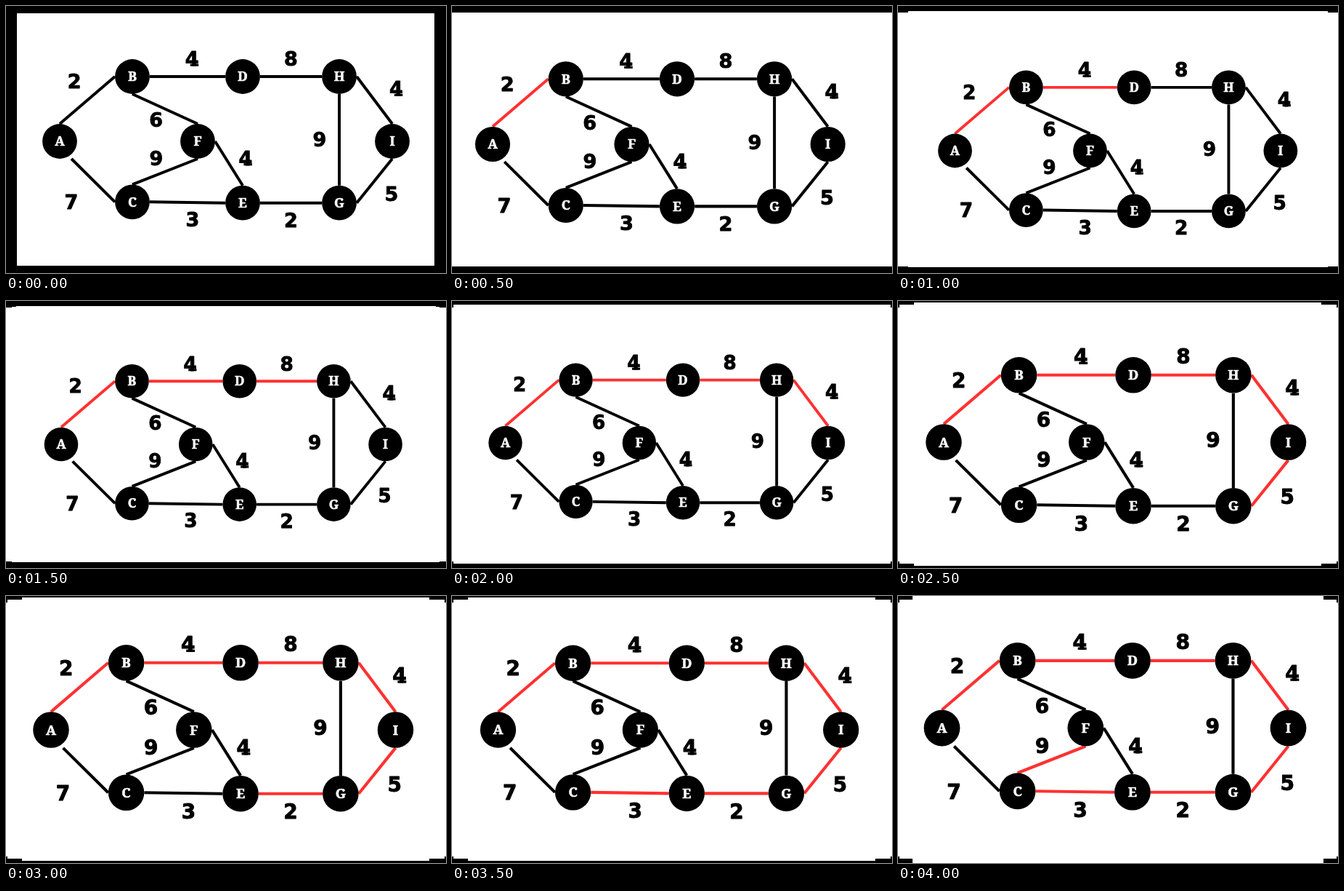
These frames come from a looping animation (606 px wide and 367 px high, 4.5 s). An HTML page with a canvas:

```html
<!DOCTYPE html>
<html lang="en">
<head>
<meta charset="utf-8">
<title>Depth-first search on a weighted graph</title>
<style>
  html, body { margin: 0; width: 100%; height: 100%; overflow: hidden; background: #000; }
  canvas { display: block; width: 606px; height: 367px; }
</style>
</head>
<body>
<canvas id="stage" width="606" height="367"></canvas>
<script>
const W = 606, H = 367, STEP = 500, R = 23.9;
const BLACK = '#000', WHITE = '#fff', RED = '#ff3131';
const ctx = document.getElementById('stage').getContext('2d');

// Node positions on three rows, relative to A.
const TOP = -89, BOTTOM = 84.7;
const nodes = {
  A: [0, 0], F: [190, 0], I: [458, 0],
  B: [100, TOP], D: [252, TOP], H: [385, TOP],
  C: [100, BOTTOM - 1.4], E: [252, BOTTOM], G: [385, BOTTOM]
};

// Where an edge meets a node, as a direction from its centre.
const ports = { n: [0, -1], e: [1, 0], s: [0, 1], w: [-1, 0], se: [0.67, 1] };

function port(name) {
  const [x, y] = nodes[name[0]];
  const [dx, dy] = ports[name.slice(1)];
  return [x + dx * 24, y + dy * 24];
}

// The label sits at fraction t of the edge, moved sideways by gap.
function edge(from, to, cost, gap, t = 0.5) {
  const [x1, y1] = port(from), [x2, y2] = port(to);
  const dx = x2 - x1, dy = y2 - y1, side = gap / Math.hypot(dx, dy);
  return { x1, y1, x2, y2, cost, x: x1 + dx * t + dy * side, y: y1 + dy * t - dx * side };
}

// Edges in the order the search walks them, one per step.
const walk = [
  edge('An', 'Bw', 2, 31, 0.53), edge('Be', 'Dw', 4, 24, 0.56),
  edge('De', 'Hw', 8, 24), edge('He', 'In', 4, 33, 0.57),
  edge('Is', 'Ge', 5, 30), edge('Gw', 'Ee', 2, 24),
  edge('Ew', 'Ce', 3, 24, 0.43), edge('Cn', 'Fs', 9, 21, 0.45)
];
const unused = [
  edge('Ase', 'Cw', 7, -43), edge('Bs', 'Fn', 6, -19, 0.45),
  edge('Fe', 'En', 4, 23, 0.59), edge('Hs', 'Gn', 9, -27)
];

// Each step places A and the scale; some also lay down a centred white panel.
const poses = [
  { at: [74, 186], scale: 1, panel: [575, 347] },
  { at: [56, 190], scale: 1.008, panel: [606, 349] },
  { at: [78.5, 199], scale: 0.979, panel: [578, 352] },
  { at: [76, 197], scale: 0.975, panel: [589, 351] },
  { at: [73.5, 195], scale: 0.9705, panel: [602, 356] },
  { at: [63, 194], scale: 1.036, panel: [561, 362] },
  { at: [62, 184], scale: 1.036 },
  { at: [63.5, 184], scale: 1.031 },
  { at: [60.5, 181.5], scale: 1.0415, panel: [566, 367] }
];

function drawPanel([w, h]) {
  ctx.fillRect(Math.floor((W - w) / 2), Math.floor((H - h) / 2), w, h);
}

function drawText(text, x, y, color, weight) {
  ctx.fillStyle = ctx.strokeStyle = color;
  ctx.lineWidth = weight;
  ctx.fillText(text, x, y);
  ctx.strokeText(text, x, y);
}

function drawEdge({ x1, y1, x2, y2 }, color) {
  ctx.strokeStyle = color;
  ctx.lineWidth = 4;
  ctx.beginPath();
  ctx.moveTo(x1, y1);
  ctx.lineTo(x2, y2);
  ctx.stroke();
}

function drawCost({ cost, x, y }) {
  drawText(cost, x, y + 9.2, BLACK, 0.9);
  // The four stands on a slab foot.
  if (cost === 4) ctx.fillRect(x - 2.5, y + 6.5, 11.5, 3.2);
}

function drawNode(name) {
  const [x, y] = nodes[name];
  ctx.fillStyle = BLACK;
  ctx.beginPath();
  ctx.arc(x, y, R, 0, Math.PI * 2);
  ctx.fill();
  drawText(name, x, y + 6.3, WHITE, 0.6);
}

function draw(step) {
  ctx.resetTransform();
  ctx.fillStyle = BLACK;
  ctx.fillRect(0, 0, W, H);
  ctx.fillStyle = WHITE;
  for (const { panel } of poses.slice(0, step + 1)) if (panel) drawPanel(panel);

  const { at, scale } = poses[step];
  ctx.setTransform(scale, 0, 0, scale, ...at);
  ctx.textAlign = 'center';
  ctx.lineJoin = 'round';

  unused.forEach(e => drawEdge(e, BLACK));
  walk.forEach((e, i) => drawEdge(e, i < step ? RED : BLACK));
  ctx.font = 'bold 27px "DejaVu Sans", sans-serif';
  [...walk, ...unused].forEach(drawCost);
  ctx.font = '900 18px "Noto Serif", serif';
  Object.keys(nodes).forEach(drawNode);
}

const start = performance.now();
function tick() {
  draw(Math.floor((performance.now() - start) / STEP) % poses.length);
  requestAnimationFrame(tick);
}
tick();
</script>
</body>
</html>
```
